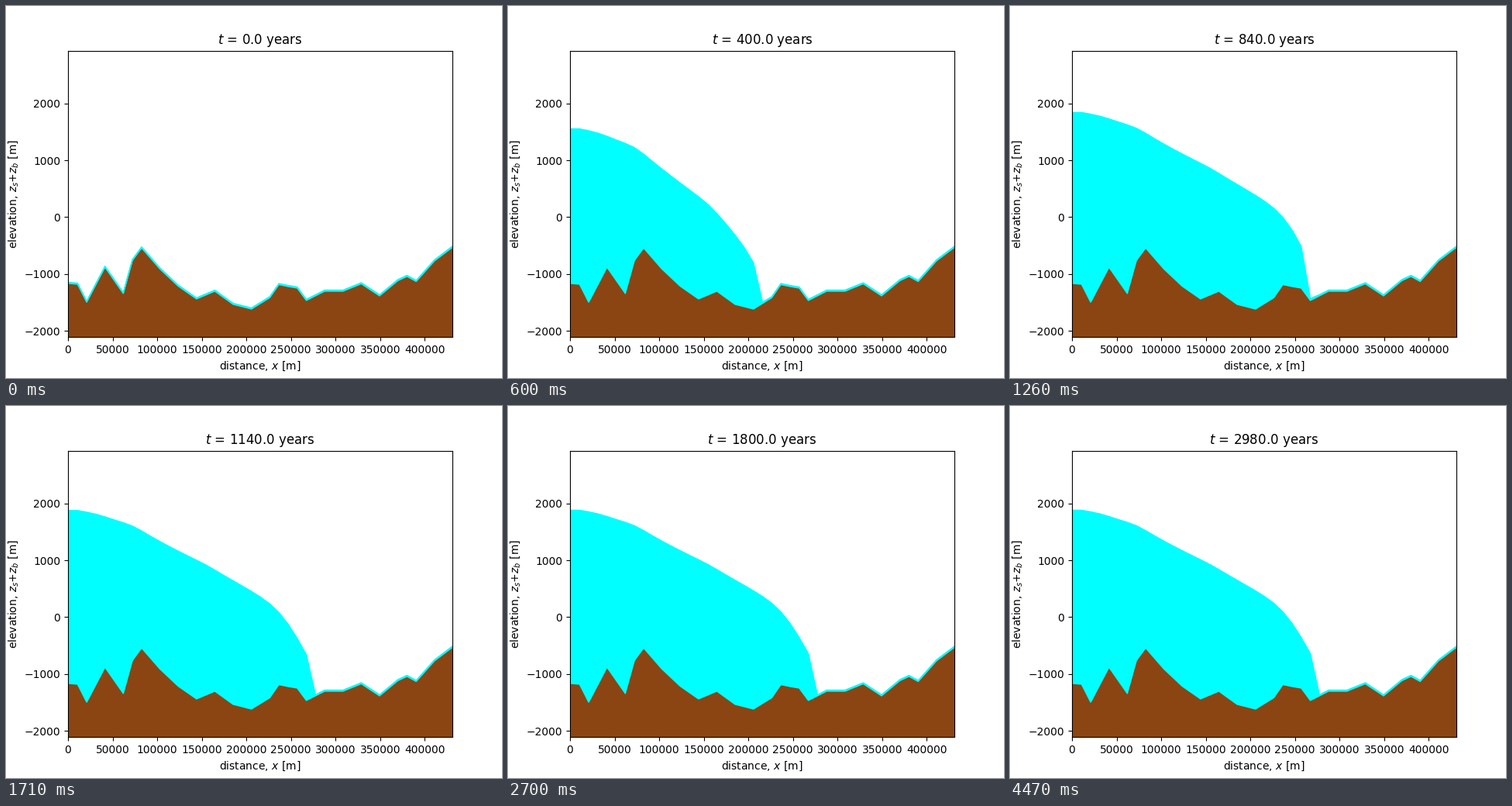
A matplotlib script that plays this animation: 640 by 480 pixels, repeating every 4.5 s.

```python
import numpy as np
import matplotlib.pyplot as plt
from matplotlib.animation import FuncAnimation

FRAMES, INTERVAL = 150, 30
YEARS = 20.0            # model years per frame
DT = 0.04               # time step, years
LENGTH, CELLS = 431e3, 42
DX = LENGTH / CELLS     # node spacing, m
FLOW = 2.7e-5           # ice flow factor, m^-3 / year
BALANCE = 14.9          # mass balance at the divide, m / year
EQUILIBRIUM = 140.5e3   # distance where the balance is zero, m
FILM = 20.0             # least ice thickness, m

# bedrock: every second node, plus the sharpest shoulders between them
nodes = np.arange(CELLS + 1)
keys = np.sort(np.r_[nodes[::2], 1, 7, 23, 25, 37])
heights = [-1160, -1173, -1490, -875, -1336, -755, -535, -905, -1208,
           -1432, -1296, -1528, -1610, -1411, -1180, -1214, -1241, -1459,
           -1296, -1296, -1166, -1378, -1111, -1036, -1125, -763, -520]
bed = np.interp(nodes, keys, heights)

x = DX * nodes
balance = BALANCE * (1 - x / EQUILIBRIUM)
width = np.full(CELLS - 1, DX)
width[0] = 1.5 * DX     # the first inner node also drains the divide


def step(ice):
    """Advance the shallow-ice thickness by one time step."""
    surface = bed + ice
    slope = (surface[1:] - surface[:-1]) / DX
    mid = 0.5 * (ice[1:] + ice[:-1])
    square = mid * mid
    flux = -FLOW * square * square * mid * slope * slope * slope
    flux[0] = 0
    ice[1:-1] += DT * (balance[1:-1] - (flux[1:] - flux[:-1]) / width)
    np.maximum(ice, FILM, out=ice)
    # flat surface at the divide
    ice[0] = max(FILM, bed[1] + ice[1] - bed[0])


def simulate():
    ice = np.full(len(bed), FILM)
    surfaces = [bed + ice]
    for _ in range(FRAMES - 1):
        for _ in range(round(YEARS / DT)):
            step(ice)
        surfaces.append(bed + ice)
    return surfaces


surfaces = simulate()

plt.rcParams["font.family"] = "DejaVu Sans"
fig, ax = plt.subplots(figsize=(6.4, 4.8), dpi=100)
floor = bed.min() - 500
ax.set_xlim(0, LENGTH)
ax.set_ylim(floor, floor + 5040)
ax.set_xlabel("distance, $x$ [m]")
ax.set_ylabel("elevation, $z_s$+$z_b$ [m]")
title = ax.set_title("")
ax.fill_between(x, floor, bed, color="saddlebrown")
glacier = ax.fill_between(x, bed, surfaces[0], color="cyan")


def update(i):
    outline = np.column_stack([np.r_[x, x[::-1]],
                               np.r_[surfaces[i], bed[::-1]]])
    glacier.set_verts([outline])
    title.set_text(f"$t$ = {i * YEARS:.1f} years")
    return glacier, title


anim = FuncAnimation(fig, update, frames=FRAMES, interval=INTERVAL,
                     repeat=True, repeat_delay=0)
plt.show()
```
